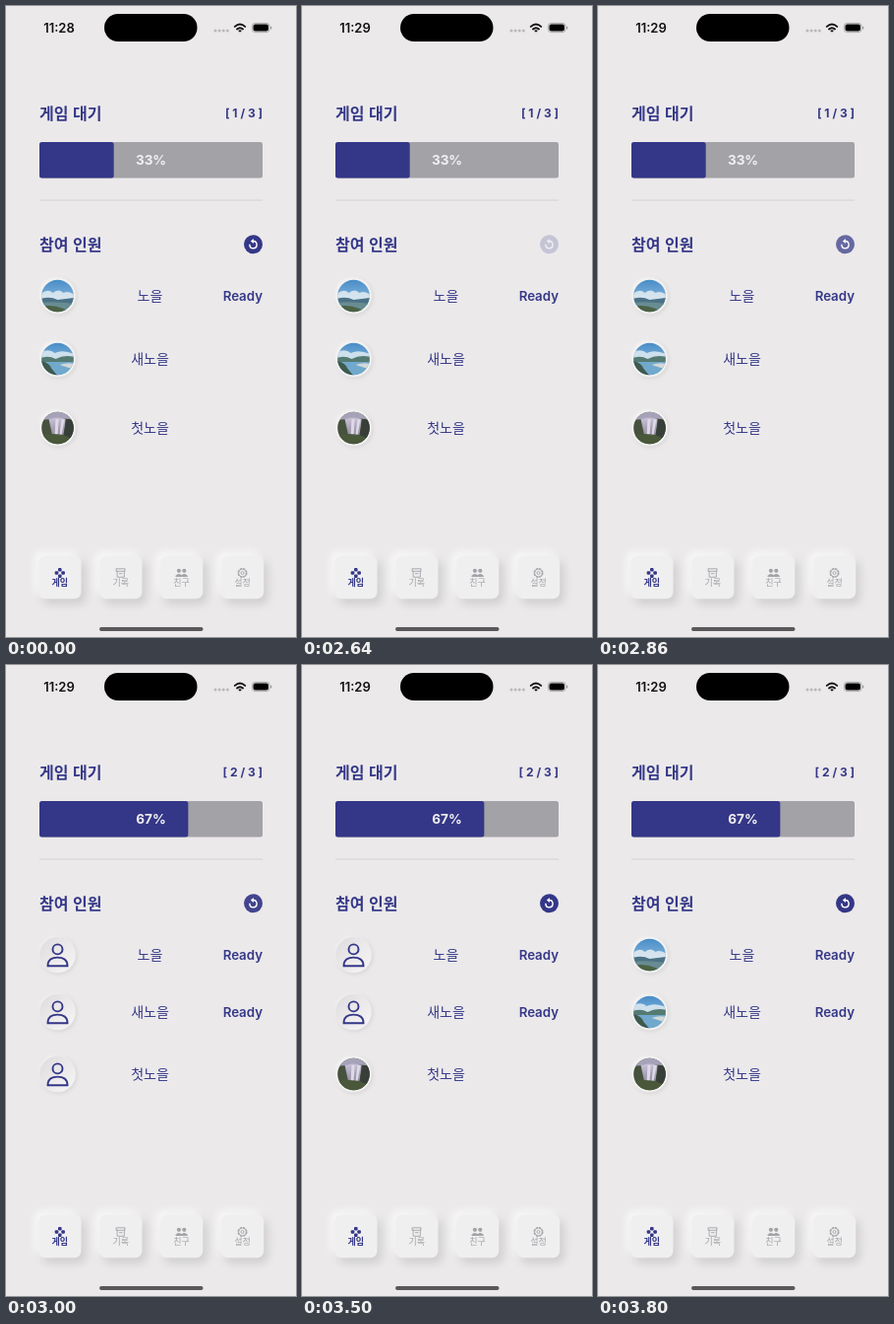
An HTML page that plays this animation: 295x640 px, repeating every 8000 ms.

```html
<!DOCTYPE html>
<html lang="ko">
<head>
<meta charset="utf-8">
<style>
html, body { margin: 0; width: 100%; height: 100%; overflow: hidden; background: #ebe9ea; }
svg { display: block; width: 100%; height: 100%; }
text { font-family: Inter, "Noto Sans CJK KR", "Noto Sans CJK", sans-serif; fill: #343787; }
.ko { font-family: "Noto Sans CJK KR", "Noto Sans CJK", sans-serif; }
.raised { filter: drop-shadow(4px 5px 5px rgba(0,0,0,.13)) drop-shadow(-4px -4px 4px rgba(255,255,255,.75)); }
.plate { filter: drop-shadow(1px 1px 2px rgba(0,0,0,.1)) drop-shadow(-1px -1px 1px rgba(255,255,255,.6)); }
</style>
</head>
<body>
<svg id="stage" viewBox="0 0 295 640">
  <defs>
    <clipPath id="round"><circle r="16.3"/></clipPath>
    <linearGradient id="sky" x2="0" y2="1"><stop stop-color="#478cc8"/><stop offset="1" stop-color="#a9cde6"/></linearGradient>
    <linearGradient id="fall" x2="0" y2="1"><stop stop-color="#c9c2d8"/><stop offset="1" stop-color="#8d8799"/></linearGradient>
    <linearGradient id="dish" x2="1" y2="1"><stop stop-color="#dddbdd"/><stop offset=".5" stop-color="#ebe9ea"/><stop offset="1" stop-color="#f7f6f7"/></linearGradient>
  </defs>
</svg>
<script>
const NAVY = '#343787', GREY = '#a3a2a7', LOOP = 8000;
const stage = document.getElementById('stage');

function add(parent, tag, attrs = {}, content) {
  const el = document.createElementNS('http://www.w3.org/2000/svg', tag);
  for (const key in attrs) el.setAttribute(key, attrs[key]);
  if (content) el.textContent = content;
  parent.append(el);
  return el;
}
const group = (x, y, parent = stage) => add(parent, 'g', { transform: `translate(${x} ${y})` });
const rect = (parent, x, y, width, height, rx, fill, more) =>
  add(parent, 'rect', { x, y, width, height, rx, fill, ...more });
const dot = (parent, cx, cy, r, fill, more) => add(parent, 'circle', { cx, cy, r, fill, ...more });
const path = (parent, d, fill, more) => add(parent, 'path', { d, fill, ...more });
const line = (parent, d, stroke, width) =>
  path(parent, d, 'none', { stroke, 'stroke-width': width, 'stroke-linecap': 'round' });
// y is the optical middle of the glyphs
const label = (content, x, y, size, weight, anchor = 'middle', more = {}, parent = stage) =>
  add(parent, 'text', { x, y: y + size * .37, 'font-size': size, 'font-weight': weight, 'text-anchor': anchor, ...more }, content);

// status bar
const clock = label('', 54, 22, 13, 600, 'middle', { style: 'fill:#111' });
rect(stage, 100, 8, 94.5, 28, 14, '#000');
for (let i = 0; i < 4; i++) dot(stage, 213 + i * 4.1, 25, 1.5, '#b9b8ba');
const wifi = group(238, 26.5);
line(wifi, 'M-5.2-5.6Q0-10.2 5.2-5.6', '#111', 1.9);
line(wifi, 'M-3-3.1Q0-5.6 3-3.1', '#111', 1.9);
path(wifi, 'M-1.8-1.6Q0-3 1.8-1.6L0 .3Z', '#111');
rect(stage, 250.4, 17.4, 17.6, 9.2, 3, 'none', { stroke: '#999', 'stroke-width': .8 });
rect(stage, 251.5, 18.5, 15.4, 7, 2, '#000');
rect(stage, 269, 20.5, 1.2, 3, .6, '#999');

// progress
label('게임 대기', 34, 109, 16, 900, 'start', { class: 'ko' });
const count = label('', 261, 109, 12, 700, 'end');
rect(stage, 34, 138, 227, 36.5, 2.5, GREY);
const bar = rect(stage, 34, 138, 0, 36.5, 2.5, NAVY);
const percent = label('', 147.5, 156, 13.5, 700, 'middle', { style: 'fill:#f0eff2' });
rect(stage, 34, 196.5, 227, 1, 0, '#d3d2d5');

// members
label('참여 인원', 34, 242, 16, 900, 'start', { class: 'ko' });
const refresh = group(251.5, 241.7);
dot(refresh, 0, 0, 9.5, NAVY);
line(refresh, 'M.2-3.1A3.6 3.6 0 1 1-3.6.5', '#fff', 1.5);
path(refresh, 'M.4-5.8V-.6L-2.7-3.2Z', '#fff');

const scenes = [
  g => {
    rect(g, -17, -17, 34, 34, 0, 'url(#sky)');
    path(g, 'M-17-2Q-10-8-5-3Q1-8 6-3Q11-6 17-1V4H-17Z', '#d4e3ee');
    path(g, 'M-17 3Q-8 0 0 4L17 2V9H-17Z', '#4c7185');
    path(g, 'M-17 7Q-5 5 17 8V17H-17Z', '#688c91');
    path(g, 'M-17 11Q-6 8 6 13L12 17H-17Z', '#4c6244');
  },
  g => {
    rect(g, -17, -17, 34, 34, 0, 'url(#sky)');
    path(g, 'M-17-7Q-8-11-3-6Q5-10 17-5V0H-17Z', '#cde0ec');
    path(g, 'M-17-1Q-9-4-2 0Q7-5 17-2V5H-17Z', '#557a72');
    rect(g, -17, 3, 34, 14, 0, '#70a9cc');
    path(g, 'M-17 2Q-8 4-6 10L0 17H-17Z', '#40594c');
    path(g, 'M2 6Q10 3 17 5V11Q9 8 2 6Z', '#d3d9d8');
  },
  g => {
    rect(g, -17, -17, 34, 34, 0, '#46513e');
    path(g, 'M-17-17H17V-8Q6-11-17-8Z', '#a6a3b9');
    path(g, 'M-9-9Q0-12 8-9L6 9H-5Z', 'url(#fall)');
    path(g, 'M-2-9H1L0 9H-3ZM4-9H7L4 7H2Z', '#dfd9e7');
    path(g, 'M-17 7Q-4 4 17 9V17H-17Z', '#49573b');
    path(g, 'M9-9L17-8V12L6 7Z', '#383f39');
  }
];

function member(name, scene) {
  const row = group(0, 0);
  const blank = group(52.5, 0, row);
  dot(blank, 0, 0, 18.3, 'url(#dish)', { class: 'plate' });
  add(blank, 'circle', { cx: 0, cy: -5.6, r: 5, fill: 'none', stroke: NAVY, 'stroke-width': 1.9 });
  line(blank, 'M-10 11.2C-10 5-6 2.6 0 2.6S10 5 10 11.2Z', NAVY, 1.9);
  const photo = group(52.5, 0, row);
  dot(photo, 0, 0, 18.3, '#f3f2f1', { class: 'plate' });
  scene(add(photo, 'g', { 'clip-path': 'url(#round)' }));
  label(name, 146.5, 0, 14, 500, 'middle', { class: 'ko' }, row);
  const ready = label('Ready', 261, 0, 13.3, 600, 'end', {}, row);
  return { row, blank, photo, ready };
}
const members = ['노을', '새노을', '첫노을'].map((name, i) => member(name, scenes[i]));

// tabs
const icons = [
  (g, c) => [[0, -3.3], [3.3, 0], [0, 3.3], [-3.3, 0]].forEach(([x, y]) =>
    rect(g, x - 1.8, y - 1.8, 3.6, 3.6, 1.1, c)),
  (g, c) => {
    line(g, 'M-4.3-4.2H4.3V-1.7H-4.3ZM-3.6-1.7V4.2H3.6V-1.7M-1.3.7H1.3', c, .9);
  },
  (g, c) => {
    for (const x of [-2.7, 2.7]) {
      dot(g, x, -2.2, 2.1, c);
      path(g, `M${x - 3.4} 4V2.7Q${x} -.9 ${x + 3.4} 2.7V4Z`, c);
    }
  },
  (g, c) => {
    add(g, 'circle', { r: 4.4, fill: 'none', stroke: c, 'stroke-width': 1.2, 'stroke-dasharray': '2.5 .95' });
    add(g, 'circle', { r: 3.8, fill: 'none', stroke: c, 'stroke-width': .7 });
    add(g, 'circle', { r: 1.5, fill: 'none', stroke: c, 'stroke-width': .9 });
  }
];
['게임', '기록', '친구', '설정'].forEach((name, i) => {
  const tab = group(54.8 + i * 61.9, 579.5), color = i ? GREY : NAVY;
  rect(tab, -21.7, -21.7, 43.4, 43.4, 7, '#f0eff0', { class: 'raised' });
  icons[i](group(0, -4.5, tab), color);
  label(name, 0, 5.3, 9, i ? 400 : 600, 'middle', { class: 'ko', style: `fill:${color}` }, tab);
});
rect(stage, 95, 630, 105.5, 4, 2, '#59585b');

// time, changed values (held until the next step)
const steps = [
  [0, { clock: '11:28', ready: 1, fade: 1, rows: [294, 358, 428], photos: [1, 1, 1] }],
  [500, { clock: '11:29' }],
  [2640, { fade: .2 }],
  [2760, { fade: .42 }],
  [2860, { fade: .72 }],
  [3000, { fade: .92, ready: 2, rows: [294, 352, 415], photos: [0, 0, 0] }],
  [3100, { fade: 1 }],
  [3500, { photos: [0, 0, 1] }],
  [3640, { photos: [1, 1, 1] }]
];

function show(state) {
  const share = state.ready / 3;
  clock.textContent = state.clock;
  count.textContent = `[ ${state.ready} / 3 ]`;
  percent.textContent = Math.round(share * 100) + '%';
  bar.setAttribute('width', 227 * share);
  refresh.setAttribute('opacity', state.fade);
  members.forEach((m, i) => {
    m.row.setAttribute('transform', `translate(0 ${state.rows[i]})`);
    m.photo.setAttribute('visibility', state.photos[i] ? 'visible' : 'hidden');
    m.blank.setAttribute('visibility', state.photos[i] ? 'hidden' : 'visible');
    m.ready.setAttribute('visibility', i < state.ready ? 'visible' : 'hidden');
  });
}

const start = performance.now();
let shown = 0;
function tick() {
  const time = (performance.now() - start) % LOOP;
  const passed = steps.filter(([at]) => at <= time);
  if (passed.length !== shown) {
    shown = passed.length;
    show(Object.assign({}, ...passed.map(step => step[1])));
  }
  requestAnimationFrame(tick);
}
tick();
</script>
</body>
</html>
```
